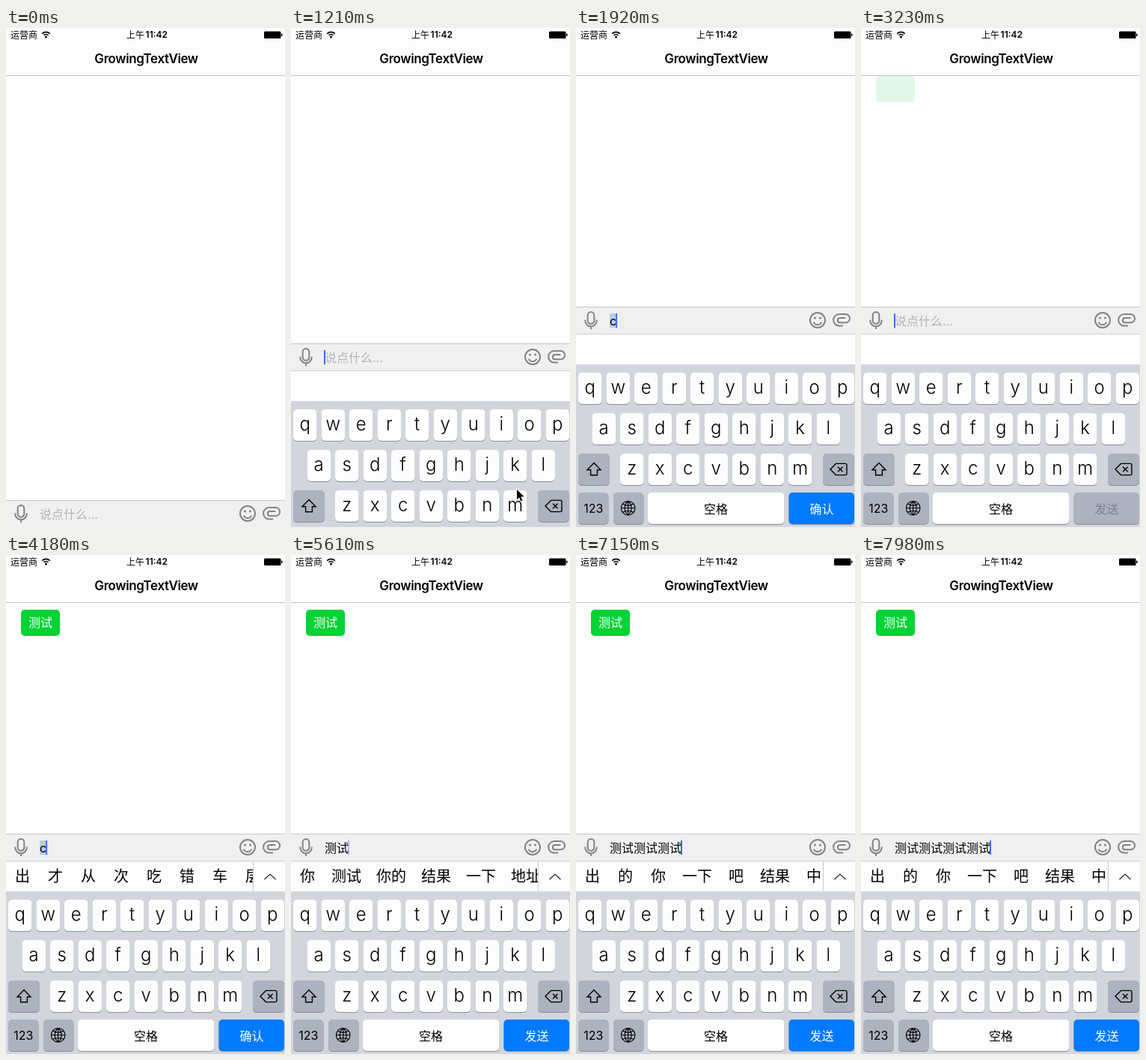
Write an HTML page with a canvas that moves like this. It is 373 px wide and 666 px high and loops after 8 s.

```html
<!DOCTYPE html>
<html lang="zh-CN">
<head>
<meta charset="utf-8">
<title>GrowingTextView</title>
<style>
  html, body { margin: 0; width: 100%; height: 100%; overflow: hidden; background: #fdfdfd; }
  canvas { display: block; width: 373px; height: 666px; }
</style>
</head>
<body>
<canvas id="stage"></canvas>
<script>
const W = 373, H = 666, LOOP = 8000;
const canvas = document.getElementById('stage');
const ctx = canvas.getContext('2d');
const dpr = window.devicePixelRatio || 1;
canvas.width = W * dpr;
canvas.height = H * dpr;

const FONT = 'Inter, "Noto Sans CJK SC", "Noto Sans CJK", sans-serif';
const ICON = '#838383';

const NEXT_A = '你 测试 你的 结果 一下 地址'.split(' ');
const NEXT_B = '出 的 你 一下 吧 结果 中'.split(' ');
const FOR_C = '出 才 从 次 吃 错 车 层'.split(' ');
const FOR_CS = '测试 从事 措施 城市 出生 产生'.split(' ');
const WORD = '测试';

// time, committed text, pinyin being composed, candidates, caret opacity
const typing = [
  [0, '', '', null, 0],
  [1090, '', '', null, 1],
  [1680, '', '', null, 0.4],
  [1800, '', '', null, 0],
  [1920, '', 'c', null, 1],
  [2040, '', 'c', FOR_C, 1],
  [2150, '', 'c s', FOR_C, 1],
  [2270, '', 'c s', FOR_CS, 1],
  [2630, WORD, '', NEXT_A, 1],
  [3230, '', '', null, 1],
  [3710, '', '', null, 0.4],
  [3830, '', '', null, 0],
  [3950, '', 'c', null, 1],
  [4070, '', 'c', FOR_C, 1],
  [4190, '', 'c s', FOR_C, 1],
  [4300, '', 'c s', FOR_CS, 1],
  [4900, WORD, '', FOR_CS, 1],
  [5020, WORD, '', NEXT_A, 1],
  [5610, WORD, '', NEXT_A, 0.4],
  [5730, WORD, '', NEXT_A, 0],
  [5840, WORD, 'c', FOR_C, 1],
  [5960, WORD, 'c s', FOR_CS, 1],
  [6320, WORD.repeat(2), '', NEXT_B, 1],
  [6560, WORD.repeat(2), 'c', FOR_C, 1],
  [6800, WORD.repeat(2), 'c s', FOR_CS, 1],
  [7150, WORD.repeat(3), '', NEXT_B, 1],
  [7390, WORD.repeat(3), 'c', FOR_C, 1],
  [7630, WORD.repeat(3), 'c s', FOR_CS, 1],
  [7860, WORD.repeat(4), '', null, 1],
  [7980, WORD.repeat(4), '', NEXT_B, 1]
];

// time, x, y of the pointer tip; no position hides it
const pointer = [
  [0], [500, 203, 647], [620, 248, 641], [740, 282, 635],
  [1090, 291, 627], [1210, 302, 616], [1330]
];

// time, top, opacity of the sent message
const message = [[0, 64, 0], [3230, 64, 0.11], [3350, 70, 0.62], [3470, 73, 1]];

const at = (steps, t) => steps.filter(s => s[0] <= t).pop();

function rect(x, y, w, h, color) {
  ctx.fillStyle = color;
  ctx.fillRect(x, y, w, h);
}

function round(x, y, w, h, r, color) {
  ctx.fillStyle = color;
  ctx.beginPath();
  ctx.roundRect(x, y, w, h, r);
  ctx.fill();
}

function text(str, x, y, size, color = '#000', align = 'left', weight = 400, spacing = 0) {
  ctx.font = `${weight} ${size}px ${FONT}`;
  ctx.letterSpacing = spacing + 'px';
  ctx.textAlign = align;
  ctx.fillStyle = color;
  ctx.fillText(str, x, y);
  return ctx.measureText(str).width;
}

function line(d, color, width, x = 0, y = 0) {
  ctx.save();
  ctx.translate(x, y);
  ctx.strokeStyle = color;
  ctx.lineWidth = width;
  ctx.stroke(new Path2D(d));
  ctx.restore();
}

function dot(x, y, r, color) {
  ctx.fillStyle = color;
  ctx.beginPath();
  ctx.arc(x, y, r, 0, 7);
  ctx.fill();
}

function drawHeader() {
  rect(0, 0, W, 63, '#fdfdfd');
  rect(0, 63, W, 1, '#c4c4c4');
  text('运营商', 6, 13.5, 12);
  ctx.strokeStyle = '#000';
  ctx.lineWidth = 1.7;
  for (const r of [4.3, 7.4]) {
    ctx.beginPath();
    ctx.arc(53.5, 12.8, r, -Math.PI * 0.75, -Math.PI * 0.25);
    ctx.stroke();
  }
  dot(53.5, 12, 1.5, '#000');
  text('上午', 161, 13.5, 12, '#000', 'left', 500);
  text('11:42', 216, 13.3, 12, '#000', 'right', 600);
  round(345, 4.5, 22.5, 9.5, 1.5, '#000');
  round(368, 7.5, 1.5, 3.5, 0.7, '#000');
  text('GrowingTextView', 187.5, 47, 17, '#000', 'center', 600, -0.4);
}

function drawMessage([, y, alpha]) {
  ctx.save();
  ctx.globalAlpha = alpha;
  round(20, y, 52, 35, 5, '#02d335');
  text(WORD, 30, y + 23, 16, '#fff');
  ctx.restore();
}

function drawInput([, done, pinyin, , caret]) {
  rect(0, 372, W, 37, '#f0f0f0');
  rect(0, 372, W, 1, '#c6c6c6');
  rect(0, 408, W, 1, '#cfcfcf');

  line('M15.7 383.2a4.3 4.3 0 0 1 8.6 0v7.3a4.3 4.3 0 0 1-8.6 0z' +
       'M12.3 389.5v1a7.7 7.7 0 0 0 15.4 0v-1M20 398v4', ICON, 2);
  line('M313 390a10 10 0 1 0 20 0a10 10 0 1 0-20 0M317.7 392.5a5.7 5.7 0 0 0 10.6 0', ICON, 2);
  dot(319.5, 387, 1.5, ICON);
  dot(326.5, 387, 1.5, ICON);
  line('M357 397.5h-5.2a7.7 7.7 0 0 1 0-15.4h8.7a5.6 5.6 0 0 1 0 11.2h-7.5' +
       'a3.1 3.1 0 0 1 0-6.2h7.3', ICON, 2);

  let x = 45;
  if (!done && !pinyin) text('说点什么...', x, 396.5, 16, '#b4b4b4');
  if (done) x += text(done, x, 396.5, 16);
  if (pinyin) {
    ctx.font = `400 16px ${FONT}`;
    rect(x, 381, ctx.measureText(pinyin).width, 19, '#b9cde6');
    x += text(pinyin, x, 396.5, 16);
  }
  ctx.globalAlpha = caret;
  rect(x - 1, 381, 2, 19, '#426bf2');
  ctx.globalAlpha = 1;
}

function drawCandidates(list) {
  rect(0, 409, W, 40, '#fdfdfd');
  if (!list) return;
  ctx.save();
  ctx.beginPath();
  ctx.rect(0, 409, 330, 40);
  ctx.clip();
  let x = 0;
  for (const word of list) {
    const cell = Math.max(44, word.length * 20 + 20);
    text(word, x + cell / 2, 436, 20, '#000', 'center');
    x += cell;
  }
  ctx.restore();
  rect(330, 408, 1, 41, '#c8c8c8');
  line('M345.5 433l7.5-7 7.5 7', '#222', 1.2);
}

function key(x, y, w, color = '#fdfdfd') {
  round(x, y + 1, w, 42, 5, '#8b8e94');
  round(x, y, w, 42, 5, color);
}

function drawKeyboard([, done, pinyin]) {
  const dark = '#adb2be';
  rect(0, 449, W, 217, '#d2d5dc');
  [['qwertyuiop', 3, 460], ['asdfghjkl', 21.5, 514], ['zxcvbnm', 59, 568]].forEach(([row, x, y]) => {
    [...row].forEach((ch, i) => {
      key(x + i * 37.5, y, 31.5);
      text(ch, x + i * 37.5 + 15.7, y + 27.5, 24, '#000', 'center', 300);
    });
  });

  key(3, 568, 42, dark);
  line('M24 580.5l9 9.2h-4.6v7h-8.8v-7h-4.6z', '#000', 1.4);
  key(330, 568, 42, dark);
  line('M340 589l7.5-7.6h12.5a2 2 0 0 1 2 2v11.2a2 2 0 0 1-2 2h-12.5z' +
       'M350 585.7l6.6 6.6M356.6 585.7l-6.6 6.6', '#000', 1.4);

  key(3, 620, 40.5, dark);
  text('123', 23.2, 647, 16, '#000', 'center');
  key(50, 620, 40.5, dark);
  line('M-9.3 0a9.3 9.3 0 1 0 18.6 0a9.3 9.3 0 1 0-18.6 0M-9.3 0h18.6M0-9.3v18.6' +
       'M0-9.3c-6 5-6 13.6 0 18.6M0-9.3c6 5 6 13.6 0 18.6' +
       'M-7.2-5.5q7.2 3.6 14.4 0M-7.2 5.5q7.2-3.6 14.4 0', '#000', 1.1, 69.7, 640.8);
  key(96, 620, 182.5);
  text('空格', 187, 647.5, 16, '#000', 'center');

  const active = done || pinyin;
  key(284.5, 620, 87.5, active ? '#007aff' : dark);
  text(pinyin ? '确认' : '发送', 328.5, 647.5, 16, active ? '#fff' : '#7c808a', 'center');
}

function drawPointer([, x, y]) {
  if (x === undefined) return;
  const arrow = new Path2D('M0 0v13.2l3-2.8 2.2 5 2.4-1-2.2-4.9h4.2z');
  ctx.save();
  ctx.translate(x, y);
  ctx.strokeStyle = '#fff';
  ctx.lineWidth = 2;
  ctx.stroke(arrow);
  ctx.fillStyle = '#000';
  ctx.fill(arrow);
  ctx.restore();
}

function keyboardDrop(t) {
  if (t < 1090) return 258;
  const s = (Math.floor((t - 1090) / 120) * 120 + 47) / 1000 * 18.3;
  return Math.round(258 * (1 + s) * Math.exp(-s));
}

function draw(t) {
  const state = at(typing, t);
  ctx.setTransform(dpr, 0, 0, dpr, 0, 0);
  rect(0, 0, W, H, '#fdfdfd');
  drawMessage(at(message, t));
  drawHeader();
  ctx.save();
  ctx.translate(0, keyboardDrop(t));
  drawInput(state);
  drawCandidates(state[3]);
  drawKeyboard(state);
  ctx.restore();
  drawPointer(at(pointer, t));
}

const start = performance.now();
function tick() {
  draw((performance.now() - start) % LOOP);
  requestAnimationFrame(tick);
}
tick();
</script>
</body>
</html>
```
